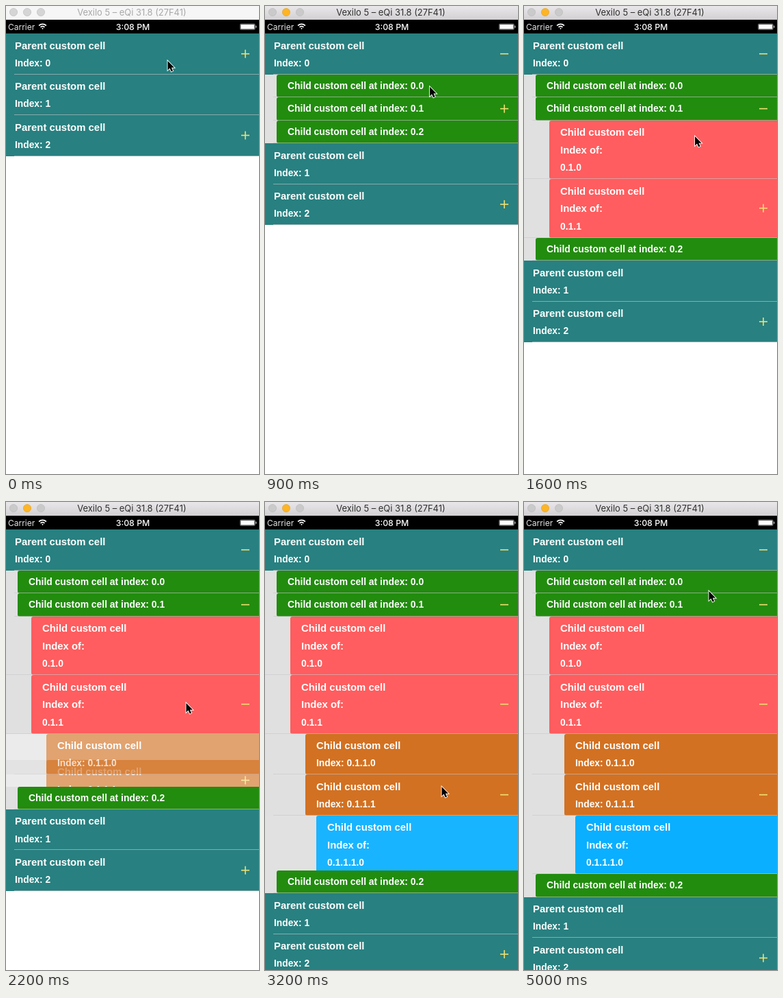
These frames come from a looping animation (370 px wide and 682 px high, 5.1 s). An HTML page with a canvas:

```html
<!DOCTYPE html>
<html lang="en">
<head>
<meta charset="utf-8">
<title>Expandable table</title>
<style>
html, body { margin: 0; width: 100%; height: 100%; overflow: hidden; background: #fff; }
canvas { display: block; }
</style>
</head>
<body>
<canvas id="stage" width="370" height="682"></canvas>
<script>
const LOOP = 5100, WIDTH = 370, HEIGHT = 682, LIST_TOP = 40;
const BOLD = '"Liberation Sans", Arial, sans-serif';
const UI = 'Inter, Roboto, sans-serif';

// Rows are composed on a layer so that each one fades as a whole.
const stage = document.getElementById('stage').getContext('2d');
const layer = document.createElement('canvas');
layer.width = WIDTH;
layer.height = HEIGHT;
const layerCtx = layer.getContext('2d');
let ctx = stage;

// Text lines are [baseline, size].
const twoLines = [[22.7, 14.9], [48, 13.8]];
const threeLines = [[22.7, 14.9], [48.5, 14.9], [74, 13.9]];
const kinds = {
  parent: { x: 0, h: 59.4, color: '#288080', text: 13, lines: twoLines, rule: 12 },
  green: { x: 17, h: 33.5, color: '#228c0f', text: 33, lines: [[21.5, 13.9]], rule: 12 },
  red: { x: 37, h: 85.5, color: '#ff5d5f', text: 53, lines: threeLines, rule: 0 },
  orange: { x: 59, h: 59.5, color: '#d27122', text: 75, lines: twoLines, rule: 12 },
  blue: { x: 75, h: 85.5, color: '#0aafff', text: 91, lines: threeLines, rule: 12 }
};
const openAt = { green: 300, red: 1207, orange: 2023, blue: 2950 };

// "opens" names the group revealed by the row; "closed" never opens here.
const row = (kind, text, opens) => ({ kind, text: text.split('|'), opens });
const rows = [
  row('parent', 'Parent custom cell|Index: 0', 'green'),
  row('green', 'Child custom cell at index: 0.0'),
  row('green', 'Child custom cell at index: 0.1', 'red'),
  row('red', 'Child custom cell|Index of:|0.1.0'),
  row('red', 'Child custom cell|Index of:|0.1.1', 'orange'),
  row('orange', 'Child custom cell|Index: 0.1.1.0'),
  row('orange', 'Child custom cell|Index: 0.1.1.1', 'blue'),
  row('blue', 'Child custom cell|Index of:|0.1.1.1.0'),
  row('green', 'Child custom cell at index: 0.2'),
  row('parent', 'Parent custom cell|Index: 1'),
  row('parent', 'Parent custom cell|Index: 2', 'closed')
];

// Cursor path: [time, x, y]
const path = [
  [0, 236, 79], [700, 236, 79], [1100, 245, 154], [1450, 245, 154],
  [1900, 263, 292], [2250, 263, 292], [2700, 258, 414], [3200, 258, 414],
  [3800, 265, 645], [4800, 265, 645], [5000, 270, 129], [5100, 270, 129]
];

const ease = u => (1 - Math.cos(Math.PI * Math.min(1, Math.max(0, u)))) / 2;
const progress = (kind, t) => kind in openAt ? ease((t - openAt[kind]) / 300) : 1;

function rect(x, y, w, h, color) {
  ctx.fillStyle = color;
  ctx.fillRect(x, y, w, h);
}

function label(text, x, y, font, color, align = 'left') {
  ctx.font = font;
  ctx.fillStyle = color;
  ctx.textAlign = align;
  ctx.fillText(text, x, y);
}

function paintRow({ kind, text, opens }, y, t) {
  const k = kinds[kind];
  const top = Math.ceil(y), h = Math.ceil(y + k.h) - top;
  rect(0, top, WIDTH, h, '#e0e0e0');
  ctx.fillStyle = k.color;
  ctx.beginPath();
  ctx.roundRect(k.x, top, WIDTH - k.x, h, k.x ? [3, 0, 0, 3] : 0);
  ctx.fill();
  rect(k.rule, top + h - 1, WIDTH - k.rule, 1, 'rgba(200, 199, 204, 0.6)');
  text.forEach((line, i) => {
    const [base, size] = k.lines[i];
    label(line, k.text, y + base, `bold ${size}px ${BOLD}`, '#fff');
  });
  if (opens) {
    const mid = y + k.h / 2;
    rect(344, mid - 0.8, 12, 1.6, '#f0e070');
    if (!(t >= openAt[opens])) rect(349.2, mid - 6, 1.6, 12, '#f0e070');
  }
}

function drawRow({ r, p, y }, t) {
  ctx = layerCtx;
  ctx.clearRect(0, 0, WIDTH, HEIGHT);
  paintRow(r, y, t);
  ctx = stage;
  ctx.globalAlpha = p;
  ctx.drawImage(layer, 0, 0);
  ctx.globalAlpha = 1;
}

function drawList(t) {
  let next = LIST_TOP;
  const placed = rows.map(r => {
    const p = progress(r.kind, t), y = next;
    next += kinds[r.kind].h * p;
    return { r, p, y };
  });
  const fading = placed.filter(c => c.p > 0 && c.p < 1).reverse();
  const solid = placed.filter(c => c.p === 1);
  [...fading, ...solid].forEach(c => drawRow(c, t));
}

function drawTitleBar(active) {
  const fill = ctx.createLinearGradient(0, 0, 0, 20);
  fill.addColorStop(0, active ? '#e9e7e9' : '#f6f6f6');
  fill.addColorStop(1, active ? '#d2d0d2' : '#f6f6f6');
  rect(0, 0, WIDTH, 20, fill);
  [11, 31, 51].forEach((x, i) => {
    const lit = active && i === 1;
    ctx.beginPath();
    ctx.arc(x, 9, 5.6, 0, 7);
    ctx.fillStyle = lit ? '#fdb425' : active ? '#cbcacb' : '#d5d5d5';
    ctx.fill();
    ctx.lineWidth = 0.6;
    ctx.strokeStyle = lit ? '#dfa023' : '#b8b7b8';
    ctx.stroke();
  });
  label('Vexilo 5 – eQi 31.8 (27F41)', 184, 14, `12.9px ${UI}`, active ? '#303030' : '#a8a8a8', 'center');
}

function drawStatusBar() {
  rect(0, 20, WIDTH, 20, '#000');
  label('Carrier', 3, 34.5, `12px ${UI}`, '#e4e4e4');
  label('3:08 PM', 185.5, 34.5, `500 12.3px ${UI}`, '#fff', 'center');
  ctx.strokeStyle = '#fff';
  ctx.lineWidth = 1.7;
  for (const r of [1, 4.3, 7.6]) {
    ctx.beginPath();
    ctx.arc(53.5, 34, r, -Math.PI * 0.75, -Math.PI * 0.25);
    ctx.stroke();
  }
  ctx.lineWidth = 0.6;
  ctx.strokeStyle = '#999';
  ctx.beginPath();
  ctx.roundRect(342.2, 25.8, 22.2, 8.8, 2);
  ctx.stroke();
  rect(343.2, 26.8, 20.2, 6.8, '#fff');
  rect(365.2, 28.7, 1.2, 3, '#ccc');
}

function drawCursor(t) {
  const i = path.findIndex(p => p[0] > t);
  const [t0, x0, y0] = path[i - 1], [t1, x1, y1] = path[i];
  const u = ease((t - t0) / (t1 - t0));
  ctx.save();
  ctx.translate(x0 + (x1 - x0) * u + 0.5, y0 + (y1 - y0) * u + 1);
  const arrow = new Path2D('M0 0V13.5L3 10.6L5.3 15.5L7.6 14.4L5.4 9.8H9.6Z');
  ctx.lineWidth = 1.8;
  ctx.strokeStyle = '#fff';
  ctx.stroke(arrow);
  ctx.fillStyle = '#000';
  ctx.fill(arrow);
  ctx.restore();
}

function frame(now) {
  const t = now % LOOP;
  rect(0, 0, WIDTH, HEIGHT, '#fff');
  drawList(t);
  drawTitleBar(t >= 200);
  drawStatusBar();
  drawCursor(t);
  requestAnimationFrame(frame);
}
requestAnimationFrame(frame);
</script>
</body>
</html>
```
